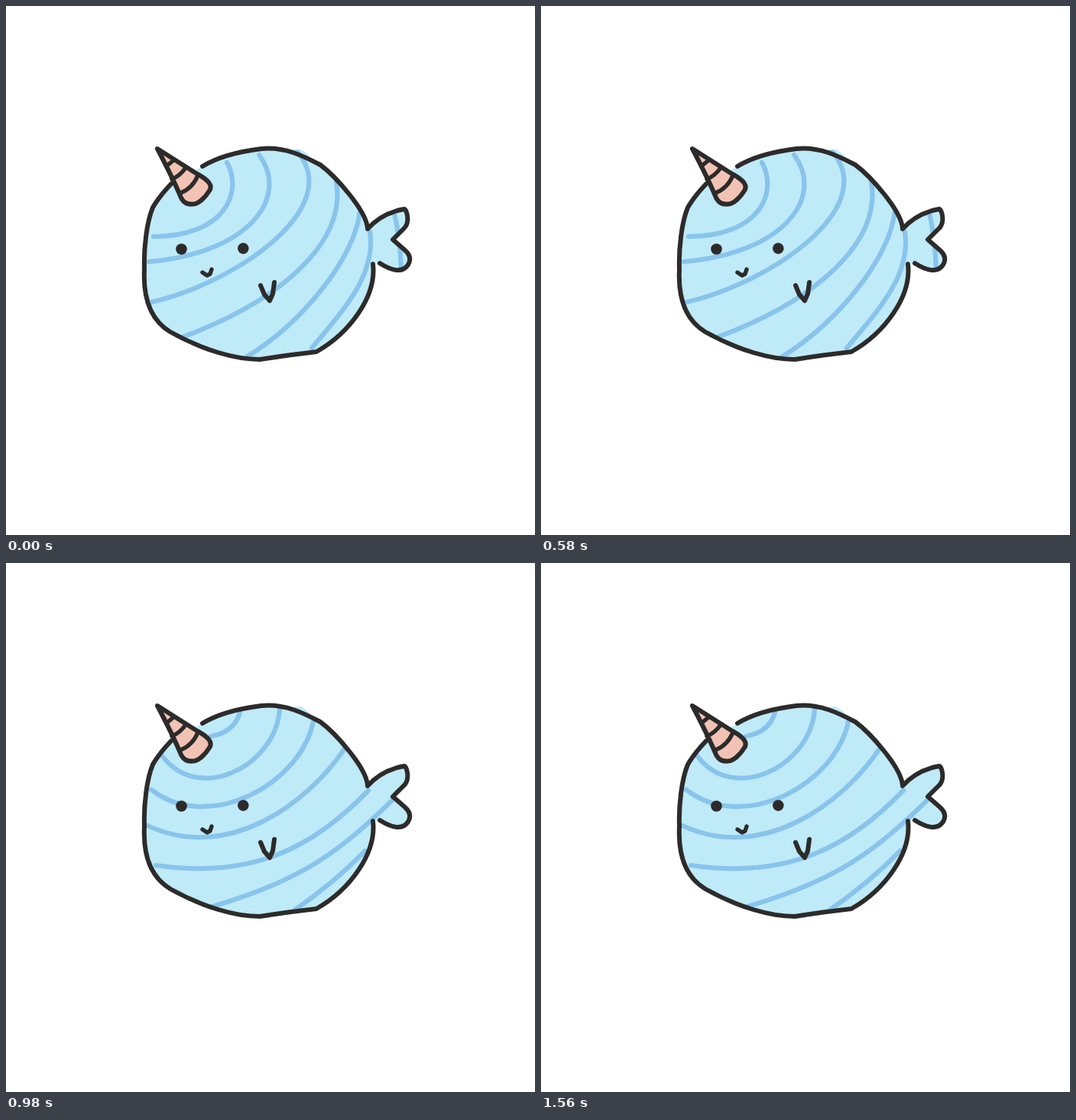
Animation of 692 by 693 pixels, one loop 1730 ms. Source, as an HTML page:

```html
<!DOCTYPE html>
<html lang="en">
<head>
<meta charset="utf-8">
<title>Striped narwhal</title>
<style>
  html, body { margin: 0; width: 100%; height: 100%; overflow: hidden; background: #fff; }
  svg { display: block; width: 100%; height: 100%; }
  .skin { fill: #bfeaf8; }
  .stripes, .ink { fill: none; stroke-linecap: round; stroke-linejoin: round; }
  .stripes { stroke: #88c4ec; stroke-width: 6.2; }
  .ink { stroke: #2d2b2a; stroke-width: 6; }
  .thin { stroke-width: 5.4; }
  .horn { fill: #f2c3b4; }
  .eye { fill: #2d2b2a; }

  /* Three stripe poses take turns, three rounds per loop. */
  .pose { visibility: hidden; animation: 1730ms step-end infinite; }
  #wide { animation-name: wide; }
  #steep { animation-name: steep; }
  #flat { animation-name: flat; }
  @keyframes wide {
    0%, 33.526%, 67.052% { visibility: visible; }
    11.561%, 45.087%, 78.613%, 100% { visibility: hidden; }
  }
  @keyframes steep {
    11.561%, 45.087%, 78.613% { visibility: visible; }
    0%, 23.121%, 56.647%, 90.173%, 100% { visibility: hidden; }
  }
  @keyframes flat {
    23.121%, 56.647%, 90.173% { visibility: visible; }
    0%, 33.526%, 67.052%, 100% { visibility: hidden; }
  }
</style>
</head>
<body>
<svg viewBox="0 0 692 693">
  <defs>
    <path id="outline" d="
      M257,210 Q285,193 334,187 C365,184 390,197 411,208 C430,222 472,268 473,292
      Q492,271 521,266 C524,266 529,283 521,291 L506,306
      L522,320 Q532,329 526,339 Q516,354 489,337
      M480,338 C485,380 450,428 406,453 Q370,457 332,463 C300,463 258,451 215,427
      C190,412 179,385 181,345 C180,318 184,283 192,264 Q200,250 216,233"/>
    <!-- Joins the two open halves of the outline. -->
    <path id="middle" d="M216,233 L257,210 300,215 474,310 489,337 480,338 450,350 220,260 Z"/>
    <path id="smudge" d="M370,189 L386,188 396,195 402,204 Z"/>
    <clipPath id="inside">
      <use href="#outline"/><use href="#middle"/><use href="#smudge"/>
    </clipPath>
  </defs>

  <g class="skin">
    <use href="#outline"/><use href="#middle"/><use href="#smudge"/>
  </g>

  <g class="stripes" clip-path="url(#inside)">
    <path id="wide" class="pose" d="
      M289,205 C311,245 285,302 193,302
      M331,195 C372,250 318,324 187,335
      M380,190 C445,262 303,362 190,388
      M432,230 C446,312 355,388 230,434
      M463,268 C457,330 387,415 316,459
      M476,296 C485,355 435,405 400,448
      M508,272 Q515,300 517,345"/>
    <path id="steep" class="pose" d="
      M319,194 C321,262 260,322 192,278
      M352,190 C366,265 285,352 185,327
      M402,207 C388,305 295,392 187,376
      M433,234 C395,320 363,370 218,427
      M459,268 C430,325 370,405 277,452
      M475,296 C452,355 400,420 338,460
      M520,288 L507,305"/>
    <path id="flat" class="pose" d="
      M306,196 Q298,222 268,227
      M358,192 C352,268 250,316 204,252
      M402,208 C385,290 265,355 190,297
      M443,243 C395,315 290,393 185,344
      M474,298 C405,370 325,415 196,396
      M507,309 C440,375 390,415 270,450
      M470,377 Q428,420 377,455"/>
  </g>

  <g class="ink">
    <use href="#outline"/>
    <path d="M333,366 L338,378 345,386 349,377 351,362"/>
    <path class="horn" d="M198,187 L250,220 Q273,232 266,242 Q258,255 248,259 Q234,262 229,251 Q218,225 198,187 Z"/>
    <path class="thin" d="M212,208 L218,203 M217,227 Q228,222 235,212 M228,245 Q244,239 251,222"/>
    <path class="thin" d="M257,349 L263,353 267,351 269,345"/>
  </g>
  <g class="eye">
    <circle cx="229.5" cy="318.5" r="7.3"/>
    <circle cx="310.3" cy="317.6" r="7.3"/>
  </g>
</svg>
</body>
</html>
```
